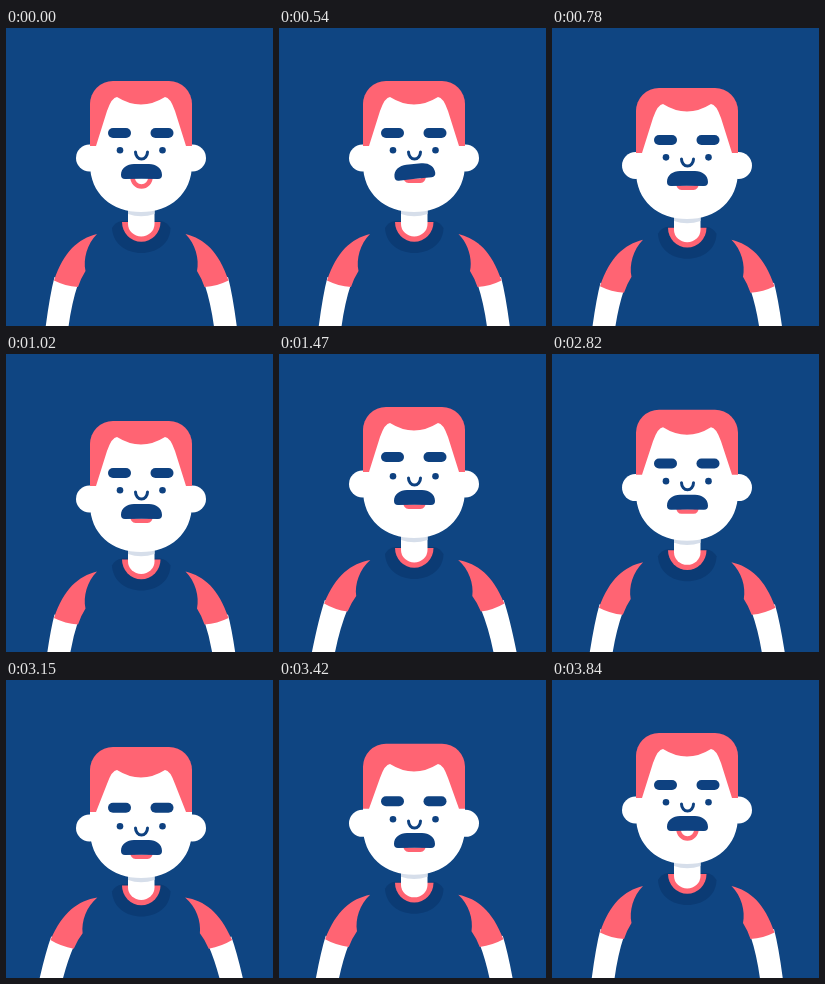
These frames come from a looping animation (267 px wide and 298 px high, 4170 ms). An HTML page:

```html
<!DOCTYPE html>
<html lang="en">
<head>
<meta charset="utf-8">
<title>Nodding man</title>
<style>
  html, body { margin: 0; width: 100%; height: 100%; overflow: hidden; background: #0f4582; }
  svg { display: block; width: 100vw; height: 100vh; }
  .ink { fill: #0e4180; }
  .pink { fill: #ff6473; }
  .white { fill: #fff; }
  .line { fill: none; }
</style>
</head>
<body>
<svg viewBox="0 0 267 298">
  <defs>
    <g id="limb">
      <path class="white" d="M48.500 249Q43 270 38 312H61Q64 280 72 256Z"/>
      <path class="pink" d="M91 206C72 211 58 223 48 252.500Q59 258 72 259Q75 250 79.500 243C77 231 81 216 91 206Z"/>
    </g>
  </defs>
  <g id="body">
    <g id="armL"><use href="#limb"/></g>
    <g transform="translate(270.5 0) scale(-1 1)"><g id="armR"><use href="#limb"/></g></g>
    <path fill="#0b3b74" d="M116 193Q109 194 106 200C107 216 120 225 135.300 225S164 216 164.500 200Q161 194 154.500 193Z"/>
    <path class="pink" d="M116 194A19.250 19.700 0 0 0 154.500 194Z"/>
    <path class="white" d="M122 176H148.500V196A13.250 12.500 0 0 1 122 196Z"/>
  </g>
  <g id="head">
    <path fill="#d6deea" d="M122 176H148.500V186Q135 190.500 122 186Z"/>
    <g id="ears" class="white">
      <circle cx="83.500" cy="130" r="13.500"/>
      <circle cx="186.500" cy="130" r="13.500"/>
    </g>
    <path class="pink" d="M84 120V76A23 23 0 0 1 107 53H163A23 23 0 0 1 186 76V120Z"/>
    <path id="skin" class="white"/>
    <g id="face">
      <g id="brows" class="ink">
        <rect x="102" y="100" width="23" height="10" rx="5"/>
        <rect x="144.500" y="100" width="23" height="10" rx="5"/>
      </g>
      <g id="eyes" class="ink">
        <circle cx="114" cy="122.300" r="3.300"/>
        <circle cx="156.500" cy="122.300" r="3.300"/>
      </g>
      <path class="line" stroke="#0e4180" stroke-width="3" stroke-linecap="round" d="M129.500 124A6 7 0 0 0 141.500 124"/>
      <path id="mouth" class="line" stroke="#ff6473" stroke-width="4.600"/>
      <path id="tache" class="ink" d="M115 147C115 140 121 136 128 136H143C150 136 156 140 156 147Q156 151 152 151Q135.500 150.400 119 151Q115 151 115 147Z"/>
    </g>
  </g>
</svg>
<script>
const LOOP = 4170;
const $ = id => document.getElementById(id);
const put = (id, value) => $(id).setAttribute('transform', value);
const shift = (id, y) => put(id, `translate(0 ${y})`);

// Smooth step from 0 to 1 between times a and b.
function ramp(t, a, b) {
  const p = Math.min(1, Math.max(0, (t - a) / (b - a)));
  return p * p * (3 - 2 * p);
}

// Rises over a..b, holds, falls over c..d.
const hump = (t, a, b, c, d) => ramp(t, a, b) - ramp(t, c, d);

function pose(t) {
  const nod = hump(t, 2700, 3120, 3210, 3720);
  return {
    nod,
    drop: hump(t, 540, 1020, 1110, 1440) + hump(t, 2700, 3120, 3270, 3750),
    swing: 5.6 * hump(t, 1020, 1380, 1380, 1640) + 5.3 * hump(t, 2700, 3060, 3060, 3780),
    brow: -2 * hump(t, 1200, 1440, 1500, 1620) - 1.2 * nod,
    smile: 1 - hump(t, 0, 150, 3570, 3750),
    tilt: -6 * hump(t, 270, 540, 540, 810) * Math.cos((t - 540) * Math.PI / 180),
    lid: 1 - .88 * hump(t, 1920, 2010, 2040, 2100)
  };
}

function draw(t) {
  const { nod, drop, swing, brow, smile, tilt, lid } = pose(t);
  shift('body', 11.5 * drop);
  shift('head', 14 * drop);
  shift('ears', drop + 3 * nod);
  shift('face', 10 * nod);
  shift('brows', brow);
  for (const arm of ['armL', 'armR']) put(arm, `rotate(${swing} 91 210)`);
  put('eyes', `translate(0 122) scale(1 ${lid}) translate(0 -122)`);
  put('tache', `rotate(${tilt} 135.5 143.5)`);

  // Hairline follows the nod at a slower rate.
  const y = 69 + 7 * nod;
  $('skin').setAttribute('d',
    `M84 118H90L101 ${y + 14}Q106 ${y} 111 ${y}Q135 ${y + 15} 159 ${y}` +
    `Q164 ${y} 169 ${y + 14}L180 118H186V136C186 166 164 184 135 184S84 166 84 136Z`);

  // Corner radii grow until the flat lip becomes a half ring.
  const rx = 3 + 6 * smile, ry = 3.7 + 5.8 * smile;
  $('mouth').setAttribute('d',
    `M126.500 149a${rx} ${ry} 0 0 0 ${rx} ${ry}h${18 - 2 * rx}a${rx} ${ry} 0 0 0 ${rx} ${-ry}`);
}

const start = performance.now();
function tick() {
  draw((performance.now() - start) % LOOP);
  requestAnimationFrame(tick);
}
tick();
</script>
</body>
</html>
```
